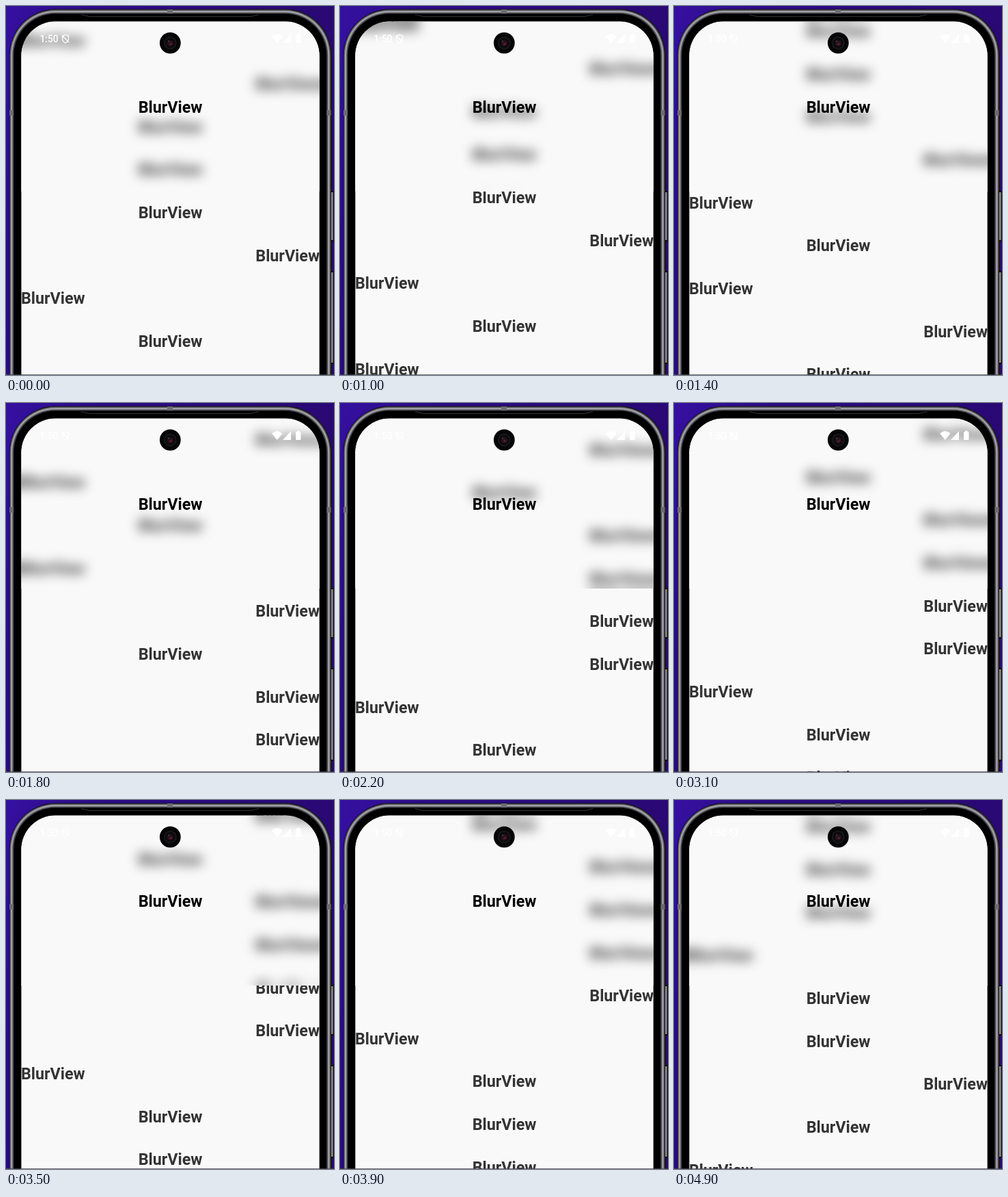
Animation, 480 px wide and 539 px high, one loop 5 s. Source, as an HTML page with a canvas:

```html
<!DOCTYPE html>
<html lang="en">
<head>
<meta charset="utf-8">
<title>BlurView</title>
<style>
html, body { margin: 0; width: 100%; height: 100%; overflow: hidden; background: #2a0a7e; }
canvas { display: block; }
</style>
</head>
<body>
<canvas id="stage" width="480" height="539"></canvas>
<script>
const W = 480, H = 539, LOOP = 5000, STEP = 100;
const LEFT = 22, TOP = 23, RIGHT = 459, BLUR_END = 271;
const SW = RIGHT - LEFT, BH = BLUR_END - TOP, PAD = 32;
const CORNER = 72; // radius at zero inset
const LABEL = 'BlurView';
const FONT = 'bold 23.3px Roboto, "Liberation Sans", sans-serif';
const ROWS = 'LRCCCRLCLRCRRRRLCCCLCCRCLCR';
const ROW_H = 62.65, FIRST_Y = 51.15;
const PAPER = '#f9f9f9';

// time, scroll offset, speed (px per ms)
const KEYS = [
  [800, 0, 0], [1400, 139.6, 0.32], [2200, 546.6, 0.64], [2600, 886.6, 0],
  [3100, 569.3, 0], [3900, 642.4, 0.146], [4900, 1014.4, 0]
];

const ctx = document.getElementById('stage').getContext('2d');

function layer(w, h) {
  const c = document.createElement('canvas');
  c.width = w;
  c.height = h;
  return c.getContext('2d');
}
const snap = layer(SW, BH);
const padded = layer(SW + 2 * PAD, BH + 2 * PAD);
const shell = layer(W, H);

function scrollAt(t) {
  if (t <= KEYS[0][0]) return 0;
  for (let i = 1; i < KEYS.length; i++) {
    const [t0, y0, v0] = KEYS[i - 1], [t1, y1, v1] = KEYS[i];
    if (t > t1) continue;
    const d = t1 - t0, u = (t - t0) / d, w = 1 - u;
    return y0 * (1 + 2 * u) * w * w + y1 * u * u * (3 - 2 * u) +
           d * u * w * (v0 * w - v1 * u);
  }
  return KEYS[KEYS.length - 1][1];
}

function label(g, side, y, color) {
  g.font = FONT;
  g.fillStyle = color;
  g.textAlign = { L: 'left', C: 'center', R: 'right' }[side];
  g.fillText(LABEL, { L: LEFT, C: (LEFT + RIGHT) / 2, R: RIGHT }[side], y + 8.3);
}

function drawList(g, scroll) {
  for (let i = 0; i < ROWS.length; i++) {
    const y = FIRST_Y + i * ROW_H - scroll;
    if (y > -20 && y < H + 20) label(g, ROWS[i], y, '#333');
  }
}

// The blurred header mirrors its content at the edges.
function drawBlur(scroll) {
  snap.fillStyle = PAPER;
  snap.fillRect(0, 0, SW, BH);
  snap.save();
  snap.translate(-LEFT, -TOP);
  drawList(snap, scroll);
  snap.restore();

  for (let i = -1; i <= 1; i++) {
    for (let j = -1; j <= 1; j++) {
      const fx = i ? -1 : 1, fy = j ? -1 : 1;
      padded.setTransform(fx, 0, 0, fy,
        PAD + (i ? (i + 1) * SW : 0), PAD + (j ? (j + 1) * BH : 0));
      padded.drawImage(snap.canvas, 0, 0);
    }
  }

  ctx.save();
  ctx.beginPath();
  ctx.rect(LEFT, TOP, SW, BH);
  ctx.clip();
  ctx.filter = 'blur(8.5px)';
  ctx.drawImage(padded.canvas, LEFT - PAD, TOP - PAD);
  ctx.restore();
}

function drawStatus() {
  ctx.fillStyle = ctx.strokeStyle = '#fff';
  ctx.font = '500 13.8px Roboto, "Liberation Sans", sans-serif';
  ctx.textAlign = 'left';
  ctx.fillText('1:50', 49.5, 52.5);

  // shield
  ctx.lineWidth = 1.3;
  ctx.stroke(new Path2D('M87 42L91.5 43.8V47.5Q91.5 52 87 54Q82.5 52 82.5 47.5V43.8ZM82 43L92 53'));

  // wifi, signal, battery
  ctx.fill(new Path2D('M389 44.5Q396.8 37.5 404.5 44.5L396.8 54Z'));
  ctx.fill(new Path2D('M417 41V54H405Z'));
  ctx.beginPath();
  ctx.roundRect(424, 42, 7.5, 12, 1.2);
  ctx.rect(426, 40.5, 3.5, 2);
  ctx.fill();
}

function disc(x, y, r, color) {
  ctx.fillStyle = color;
  ctx.beginPath();
  ctx.arc(x, y, r, 0, Math.PI * 2);
  ctx.fill();
}

function drawCamera() {
  disc(240.3, 54, 15.4, '#050506');
  disc(240.3, 54, 9.5, '#18181b');
  disc(240.3, 54, 7.5, '#0b0a0d');
  disc(240.3, 54.5, 4.5, '#2a1119');
  disc(241, 55.5, 1.8, '#54202c');
  disc(238, 51.5, 1, '#4b4650');
}

function buildShell() {
  const g = shell;
  const bg = g.createLinearGradient(0, 0, W, 200);
  bg.addColorStop(0, '#3511a0');
  bg.addColorStop(0.25, '#2c0a86');
  bg.addColorStop(1, '#28086f');
  g.fillStyle = bg;
  g.fillRect(0, 0, W, H);

  // side buttons
  for (const [y, h] of [[270, 74], [387, 136]]) {
    g.fillStyle = '#0a0a0c';
    g.beginPath();
    g.roundRect(472, y, 7.5, h, 2);
    g.fill();
    g.fillStyle = '#909096';
    g.fillRect(475.5, y + 2, 3, h - 4);
  }

  // metal rim, then black bezel
  const rim = [[4.5, '#121215'], [5.6, '#5a5a60'], [7, '#a0a0a6'],
               [9.4, '#4a4a50'], [11.3, '#000']];
  for (const [inset, color] of rim) {
    g.fillStyle = color;
    g.beginPath();
    g.roundRect(inset, inset, W - 2 * inset + 0.5, 700, CORNER - inset);
    g.fill();
  }

  // antenna breaks
  g.fillStyle = '#6c6c72';
  g.fillRect(236, 5, 8, 6);
  g.fillRect(5, 152, 6, 8);
  g.fillRect(469.5, 152, 6, 8);

  // earpiece
  g.strokeStyle = '#34343a';
  g.lineWidth = 1;
  g.stroke(new Path2D('M110 12.5L122 15.5H358L370 12.5'));
}

function draw(t) {
  const scroll = scrollAt(t);
  ctx.drawImage(shell.canvas, 0, 0);

  ctx.save();
  ctx.beginPath();
  ctx.roundRect(LEFT + 0.4, TOP - 0.4, SW - 0.8, 700, CORNER - LEFT);
  ctx.clip();
  ctx.fillStyle = PAPER;
  ctx.fillRect(LEFT, TOP - 1, SW, H);
  drawList(ctx, scroll);
  drawBlur(scroll);
  label(ctx, 'C', 148, '#000');
  drawStatus();
  ctx.restore();

  drawCamera();
  ctx.fillStyle = 'rgba(70, 70, 74, 0.75)';
  ctx.fillRect(0, H - 1, W, 1);
}

buildShell();
const start = performance.now();
function tick() {
  const t = (performance.now() - start) % LOOP;
  draw(Math.floor(t / STEP) * STEP);
  requestAnimationFrame(tick);
}
tick();
</script>
</body>
</html>
```
